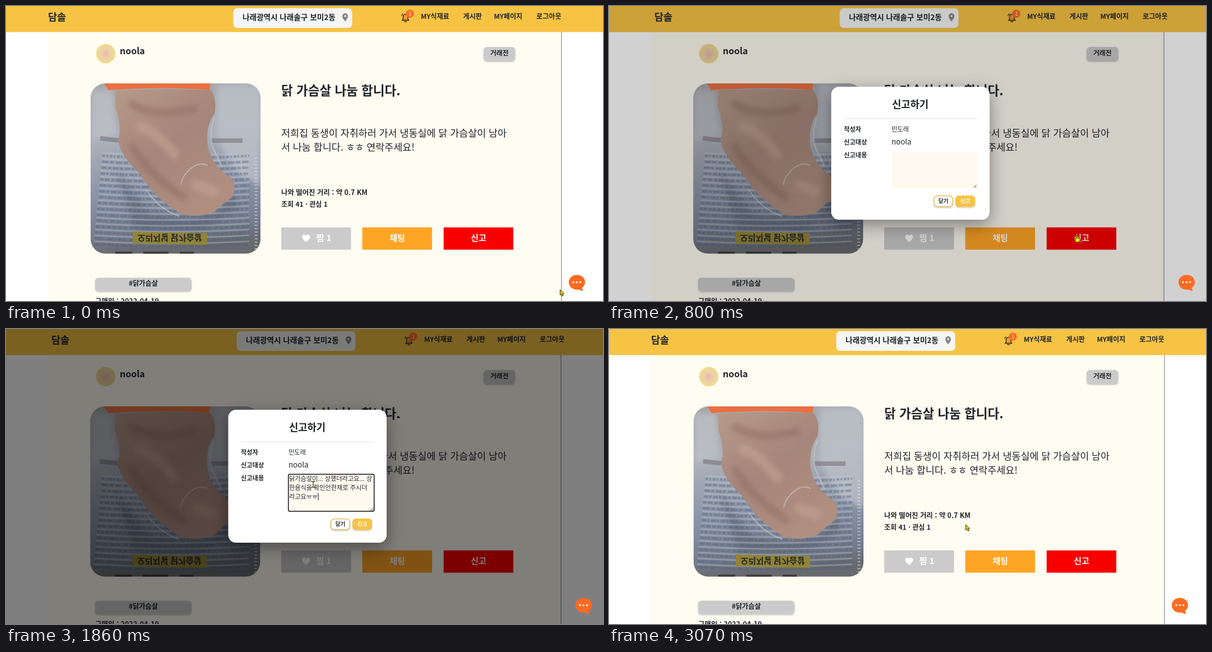
Animation, 1065 px wide and 526 px high, one loop 3.6 s. Source, as an HTML page:

```html
<!DOCTYPE html>
<html lang="ko">
<head>
<meta charset="utf-8">
<style>
html, body { margin: 0; width: 100%; height: 100%; overflow: hidden; background: #fefefe; }
svg { display: block; width: 1065px; height: 526px; }
text { font-family: "Noto Sans CJK KR", "Noto Sans CJK", "Noto Sans KR", sans-serif; font-weight: 900; fill: #212529; white-space: pre; }
.r text, text.r { font-weight: 400; }
.w text, text.w { fill: #fff; }
.m text { text-anchor: middle; }
</style>
</head>
<body>
<svg viewBox="0 0 1065 526">
  <defs>
    <linearGradient id="wrap" x2=".1" y2="1">
      <stop stop-color="#a4a6a9"/><stop offset=".35" stop-color="#abb0b9"/>
      <stop offset=".65" stop-color="#8b95a8"/><stop offset=".9" stop-color="#747d8d"/><stop offset="1" stop-color="#66696e"/>
    </linearGradient>
    <linearGradient id="meat" x2=".7" y2="1">
      <stop stop-color="#b69a89"/><stop offset=".5" stop-color="#a5867a"/><stop offset="1" stop-color="#b08f80"/>
    </linearGradient>
    <radialGradient id="face">
      <stop stop-color="#eab6b4"/><stop offset=".45" stop-color="#eccfa8"/><stop offset="1" stop-color="#f0dc8c"/>
    </radialGradient>
    <filter id="blur" x="-30%" y="-30%" width="160%" height="160%"><feGaussianBlur stdDeviation="5"/></filter>
    <filter id="soft" x="-30%" y="-30%" width="160%" height="170%"><feDropShadow dx="0" dy="9" stdDeviation="15" flood-opacity=".4"/></filter>
    <filter id="low" x="-10%" y="-10%" width="120%" height="140%"><feDropShadow dx="0" dy="1.5" stdDeviation="1" flood-opacity=".25"/></filter>
    <clipPath id="frame"><rect x="151" y="138" width="303" height="303.5" rx="26"/></clipPath>
  </defs>

  <path fill="#fffcf2" d="M74 46h916v480H74z"/>
  <path id="edge" fill="#b9b8b5" d="M990 46h2v480h-2z"/>
  <circle cx="178" cy="85" r="17.3" fill="url(#face)"/>
  <text x="203" y="86" font-size="16">noola</text>
  <g fill="#cbcbcb" filter="url(#low)">
    <rect x="852" y="73" width="56.5" height="25" rx="6"/>
    <rect x="159" y="484.5" width="172" height="24" rx="6"/>
  </g>
  <g class="m">
    <text x="880.3" y="88" font-size="11.8">거래전</text>
    <text x="245" y="499" font-size="12.2">#닭가슴살</text>
  </g>
  <text x="159" y="530.5" font-size="12.5">구매일 : 2022-04-19</text>

  <g id="photo" clip-path="url(#frame)">
    <path fill="url(#wrap)" d="M150 137h306v306H150z"/>
    <g filter="url(#blur)">
      <path fill="#bfc3ca" d="M376 140h78v180l-40-20-38-60z" opacity=".7"/>
      <path fill="#c9ccd1" d="M152 150h38l8 80-46 10z" opacity=".5"/>
      <path fill="#575f6e" d="M196 290l60 80 60 12 60-12 30-40 6 30-60 40H230z" opacity=".45"/>
    </g>
    <g id="print" fill="none"></g>
    <path stroke="#736d78" stroke-width="8" opacity=".55" d="M168 236l38 4M366 240h56"/>
    <path fill="none" stroke="#d9dde3" stroke-width="5" stroke-dasharray="2 4" d="M446 270v170" opacity=".6"/>
    <path fill="url(#meat)" d="M195 151Q280 146 365 150Q377 165 372 192Q356 212 360 250Q367 285 400 305Q413 318 403 341Q382 356 372 367Q345 378 315 372Q265 344 238 298Q200 263 200 236Q208 220 195 180Z"/>
    <g fill="none" stroke-linecap="round" filter="url(#blur)">
      <path stroke="#8d6c60" stroke-width="14" opacity=".5" d="M225 175q40 25 110 8M225 250q30 50 90 90"/>
      <path stroke="#c9aa98" stroke-width="18" opacity=".5" d="M240 215q30 10 60 50M340 320l30 10"/>
    </g>
    <path fill="none" stroke="#d8d0ca" stroke-width="2" stroke-linecap="round" opacity=".55" d="M323 296q18-20 36-12M312 318q3-14 10-20M250 328q25 36 58 46M372 200q-10 20-4 50l16 35"/>
    <path fill="#ea7043" d="M175 138h190l-2 12q-75-7-180 0z"/>
    <path fill="#918435" d="M226 402l133 3-1 21-132-3z"/>
    <text x="292" y="-408" font-size="15" transform="scale(1 -1)" text-anchor="middle">오리지널 닭가슴살</text>
    <path stroke="#3b3b3d" stroke-width="4" d="M195 440h30M245 440h45M310 440h25"/>
  </g>

  <text x="491" y="159" font-size="22.5">닭 가슴살 나눔 합니다.</text>
  <g class="r" font-size="17.4">
    <text x="491" y="233">저희집 동생이 자취하러 가서 냉동실에 닭 가슴살이 남아</text>
    <text x="491" y="257.5">서 나눔 합니다. ㅎㅎ 연락주세요!</text>
  </g>
  <text x="491" y="336.5" font-size="12.4">나와 떨어진 거리 : 약 0.7 KM</text>
  <text x="491" y="357.5" font-size="12">조회 41 · 관심 1</text>
  <path fill="#cbcbcb" d="M491 394.700h124.500v39.800H491z"/>
  <path fill="#ffa526" d="M635.500 394.700H760v39.800H635.500z"/>
  <path fill="#f90000" d="M780.700 394.700h124.300v39.800H780.700z"/>
  <path fill="#fff" d="M535.500 421c-4-3.500-7-6-7-9.200c0-4.500 5-5.300 7-2c2-3.300 7-2.500 7 2c0 3.200-3 5.700-7 9.200z"/>
  <g class="w m" font-size="15">
    <text x="567" y="418.500">찜 1</text><text x="698" y="418.500">채팅</text><text x="843" y="418.500">신고</text>
  </g>

  <path fill="#f6c344" d="M0 0h1065v46.500H0z"/>
  <g id="nav">
    <text x="75" y="26" font-size="17.5">담솔</text>
    <rect x="405.500" y="4" width="212" height="35" rx="7" fill="#f5f5f4"/>
    <text x="422" y="25" font-size="13.6">나래광역시 나래솔구 보미2동</text>
    <path fill="#858585" fill-rule="evenodd" d="M605 27.500c-3-4-5-6.500-5-9.500a5 5 0 0 1 10 0c0 3-2 5.500-5 9.500zM603.200 18a1.800 1.800 0 0 0 3.600 0a1.800 1.800 0 0 0-3.600 0z"/>
    <g fill="none" stroke="#2b2417" stroke-width="1.400" stroke-linecap="round">
      <path fill="#ef9a35" d="M707 25.500h11.500l-1.500-2.500v-4c0-5.500-8.500-5.500-8.500 0v4z"/>
      <path d="M711 27.500q1.800 1.500 3.600 0M706 17q.3-2 1.800-3M719.500 19v-1"/>
    </g>
    <circle cx="720.500" cy="13.700" r="7.200" fill="#fd6b22"/>
    <text class="w r" x="718.300" y="17" font-size="9">1</text>
    <g font-size="12.100">
      <text x="740" y="23">MY식재료</text><text x="815.500" y="23">게시판</text>
      <text x="870.500" y="23">MY페이지</text><text x="946" y="23">로그아웃</text>
    </g>
  </g>

  <path id="dim" d="M0 0h1065v526H0z"/>

  <g id="modal">
    <rect x="396.500" y="144" width="282.500" height="237" rx="14" fill="#fff" filter="url(#soft)"/>
    <text x="537.500" y="182" font-size="17.700" text-anchor="middle">신고하기</text>
    <path fill="#dcdfe2" d="M419 200.500h238v1H419z"/>
    <g font-size="11.200">
      <text x="419" y="223.500">작성자</text><text x="419" y="246.500">신고대상</text><text x="419" y="269.700">신고내용</text>
      <text class="r" x="504" y="223.500">민도래</text><text class="r" x="504" y="246.500" font-size="13.300">noola</text>
    </g>
    <path fill="#fffaf0" d="M504 260h152.500v65H504z"/>
    <rect id="ring" x="503.700" y="259" width="153" height="66" rx="2.500" fill="none" stroke="#101010" stroke-width="1.500"/>
    <path stroke="#555" d="M650 324l5.500-5.500M653 324l2.500-2.500"/>
    <g id="note" class="r" font-size="11.150">
      <text x="505" y="271">닭가슴살이... 상했더라고요... 상</text>
      <text x="505" y="287">한음식을 확인안한채로 주시더</text>
      <text x="505" y="303">라고요ㅠㅠ</text>
    </g>
    <path id="caret" fill="#111" d="M0 0h1v13H0z"/>
    <g filter="url(#low)">
      <rect x="579.700" y="338.700" width="33.600" height="19" rx="6" fill="#fff" stroke="#e9b54a" stroke-width="1.300"/>
      <rect x="618" y="338" width="35" height="20.300" rx="6" fill="#f6c344"/>
    </g>
    <g class="m" font-size="9.600">
      <text x="596.500" y="351">닫기</text><text class="w" x="635.500" y="351">신고</text>
    </g>
  </g>

  <g id="chat">
    <path fill="#fd6b22" d="M1018.500 479.500c8.500 0 14.500 5.500 14.500 13c0 4.500-2.500 8-5.500 10l2 5.500c-3 0-6-1-8-2.500c-10 1.500-17.500-4.500-17.500-13c0-7.500 6-13 14.500-13z"/>
    <path stroke="#fff" stroke-width="3.400" stroke-linecap="round" d="M1012 492.500h0M1018.300 492.500h0M1024.600 492.500h0"/>
  </g>

  <g id="cursor" stroke-linejoin="round">
    <path id="arrow" fill="#f3d90c" stroke="#2e2a12" d="M.5 0v9.500l2.300-2l1.700 3.700l1.700-.8l-1.700-3.600h3z"/>
    <path id="hand" fill="#f8ec10" stroke="#3a3408" stroke-width=".9" d="M-1 1q1-1.500 2 0v4.500l4 1q1.500.5 1 2.500l-1 4h-5.500l-3.500-5q0-1.500 1.300-1l1.700 1.200z"/>
    <path id="beam" fill="none" stroke="#55501c" stroke-width="1.500" d="M-3.500-5h7M0-5V5M-3.500 5h7"/>
  </g>
</svg>
<script>
const LOOP = 3600, STEP = 200 / 3, OPEN = 660, CLOSE = 3070;
const el = id => document.getElementById(id);
const clamp = v => Math.max(0, Math.min(1, v));
const show = (id, on) => el(id).style.display = on ? "" : "none";
const move = (id, x, y = 0) => el(id).setAttribute("transform", `translate(${x} ${y})`);

// faint rows of print on the wrapping, pale paper between them
let rows = "";
for (let i = 0; i < 16; i++) {
  const y = 262 + i * 10.5, left = 172 - i, row = `M${left} ${y}q130 8 ${262 + i} 0`;
  rows += `<path d="${row}" stroke="#c3c8d0" stroke-width="2.5" opacity=".4"/>
    <path d="${row}" transform="translate(0 5)" stroke="#4f5f7d" stroke-width="4"
      stroke-dasharray="${5 + i * 7 % 9} 2 ${3 + i * 5 % 7} 3" opacity=".4"/>`;
}
el("print").innerHTML = rows;

// pointer path: time, x, y
const path = [
  [0, 988, 506], [320, 834, 408], [800, 834, 408], [1120, 590, 296], [1260, 548, 277],
  [2000, 548, 277], [2260, 599, 310], [2520, 636, 349], [LOOP, 636, 349]
];

function pointer(t) {
  const i = path.findIndex(k => k[0] > t);
  const [t0, x0, y0] = path[i - 1], [t1, x1, y1] = path[i];
  const p = (t - t0) / (t1 - t0);
  return [x0 + (x1 - x0) * p, y0 + (y1 - y0) * p];
}

function draw(t) {
  const open = t >= OPEN && t < CLOSE;
  const frame = Math.min(LOOP - 1, Math.floor((t + 14) / STEP) * STEP);
  const focus = t >= 1400 && t < 2720, typed = t >= 1860;

  move("nav", open ? 6 : 0);
  move("chat", open ? 12 : 0);
  move("edge", open ? -1 : 0);
  move("photo", open ? -.7 : 0);

  show("dim", open);
  el("dim").style.opacity = .5 * clamp((frame - 11 * STEP) / 190);
  show("modal", open);
  el("modal").style.opacity = t < 730 ? .5 : 1;
  show("ring", focus);
  show("note", typed);
  show("caret", focus && t < 2390);
  typed ? move("caret", 556.5, 292.5) : move("caret", 506, 261);

  const [x, y] = pointer(frame);
  const inside = (l, r, top, bottom) => x >= l && x <= r && y >= top && y <= bottom;
  const beam = open && inside(504, 657, 260, 325);
  const hand = inside(781, 905, 395, 434) || open && inside(618, 653, 338, 358);
  move("cursor", x, y);
  show("beam", beam);
  show("hand", hand);
  show("arrow", !beam && !hand);
}

function tick(now) {
  draw(now % LOOP);
  requestAnimationFrame(tick);
}
draw(0);
requestAnimationFrame(tick);
</script>
</body>
</html>
```
